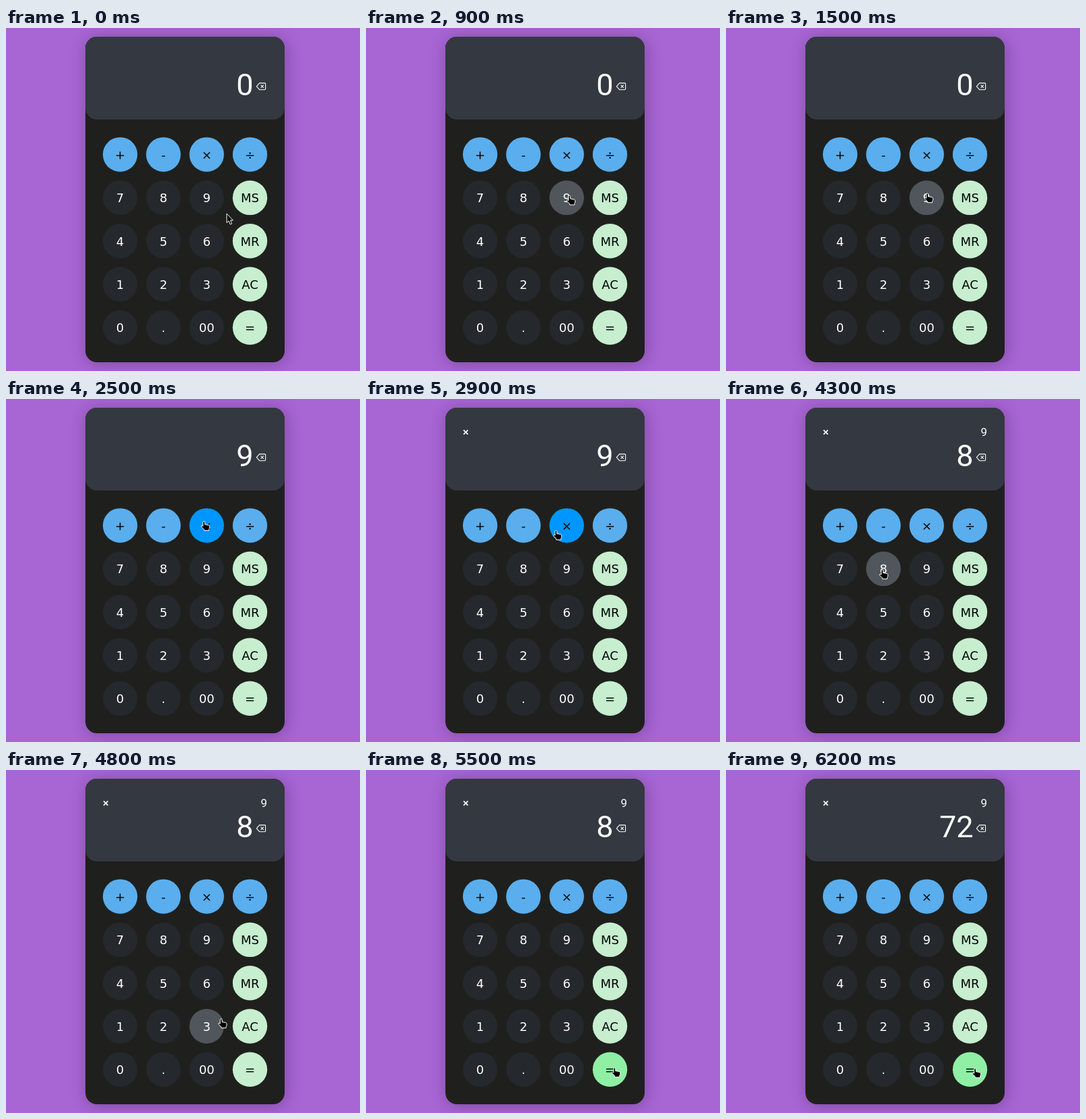
Write an HTML page that moves like this. It is 526 by 510 pixels and loops after 6700 ms.

```html
<!DOCTYPE html>
<html lang="en">
<head>
<meta charset="utf-8">
<title>Calculator</title>
<style>
  html, body { margin: 0; width: 100%; height: 100%; overflow: hidden; background: #a865d4; }
  #card {
    position: absolute; left: 118.3px; top: 12.7px; width: 295.4px; height: 484.3px;
    border-radius: 17px; background: #1f201d; box-shadow: 2px 2px 24px rgba(20, 5, 40, .28);
  }
  #screen { height: 123.8px; border-radius: 17px; background: #343840; }
  svg { position: absolute; left: 0; top: 0; display: block; }
  text { font: 18px "DejaVu Sans", sans-serif; text-anchor: middle; }
  .op { --base: #5aaeed; --hot: #0096ff; --ink: #000; }
  .num { --base: #25282c; --hot: #50565b; --ink: #fff; }
  .fn { --base: #c6eecf; --hot: #8fefa5; --ink: #000; }
  .key circle { fill: var(--base); }
  .key.on circle { fill: var(--hot); }
  .key text { fill: var(--ink); }
  #sign, #memo, #value { font-family: Roboto, sans-serif; font-size: 17px; fill: #fff; }
  #sign { font-weight: 500; text-anchor: start; }
  #memo, #value { text-anchor: end; }
  #value { font-size: 45px; }
  #erase { fill: none; stroke: #fff; stroke-width: 1.1; stroke-linejoin: round; }
  #cursor path { fill: #000; stroke: #fff; stroke-width: 1; stroke-linejoin: round; }
</style>
</head>
<body>
<div id="card"><div id="screen"></div></div>
<svg width="526" height="510" viewBox="0 0 526 510">
  <text id="sign" x="143.7" y="55"></text>
  <text id="memo" x="388" y="55"></text>
  <text id="value" x="367.6" y="100.3">0</text>
  <path id="erase" d="M376.6 81.9H384.4Q385.6 81.9 385.6 83V90.6Q385.6 91.7 384.4 91.7H376.6L372.3 86.8ZM378.6 84.7L382.8 88.9M382.8 84.7L378.6 88.9"/>
  <g id="keys"></g>
  <g id="cursor">
    <path id="arrow" d="M0 0V13.5L3 10.8L5.2 16L7.6 15L5.4 10H9.3Z"/>
    <path id="hand" d="M-1.3 1.2Q-1.3 -.2 .1 -.2T1.5 1.2V4.6L7.2 5.6Q8.6 6 8.5 7.5V9.8L7.5 11.5V13.6H.3V11.8L-3.8 8Q-4.4 6.2 -2.6 6.3L-1.3 7.2Z"/>
  </g>
</svg>
<script>
  const LOOP = 6700, STEP = 100, RADIUS = 25.7, PITCH = 64.3;
  const NS = "http://www.w3.org/2000/svg";
  const $ = id => document.getElementById(id);

  function add(parent, tag, attrs) {
    const el = document.createElementNS(NS, tag);
    for (const name in attrs) el.setAttribute(name, attrs[name]);
    return parent.appendChild(el);
  }

  const keys = [];
  const rows = ["+ - × ÷", "7 8 9 MS", "4 5 6 MR", "1 2 3 AC", "0 . 00 ="];
  rows.forEach((row, r) => row.split(" ").forEach((label, c) => {
    const x = 169.6 + c * PITCH, y = 188.1 + r * PITCH;
    const kind = r === 0 ? "op" : c === 3 ? "fn" : "num";
    const el = add($("keys"), "g", { class: "key " + kind });
    add(el, "circle", { cx: x, cy: y, r: RADIUS });
    add(el, "text", { x, y: y + 6.8 }).textContent = label;
    keys.push({ el, x, y });
  }));

  // Each move slows down towards its goal.
  const home = { x: 328, y: 276 };
  const moves = [
    { from: 100, to: 1300, x: 299, y: 246 },
    { from: 1900, to: 2500, x: 294, y: 182 },
    { from: 2800, to: 3800, x: 232, y: 254 },
    { from: 4400, to: 4800, x: 319.5, y: 370 },
    { from: 4800, to: 5600, x: 370, y: 444 }
  ];

  const presses = [
    { at: 0, sign: "", memo: "", value: "0" },
    { at: 1800, value: "9" },
    { at: 2700, sign: "×" },
    { at: 4200, memo: "9", value: "8" },
    { at: 6000, value: "72" }
  ];

  const easeOut = k => 1 - (1 - k) ** 2;

  function pointer(t) {
    let { x, y } = home;
    for (const m of moves) {
      const k = easeOut(Math.min(1, Math.max(0, (t - m.from) / (m.to - m.from))));
      x += (m.x - x) * k;
      y += (m.y - y) * k;
    }
    return { x, y };
  }

  function draw(time) {
    const t = Math.floor(time % LOOP / STEP) * STEP;
    const { x, y } = pointer(t);
    let over = false;
    for (const key of keys) {
      const on = Math.hypot(x - key.x, y - key.y) < RADIUS;
      key.el.classList.toggle("on", on);
      over = over || on;
    }
    $("cursor").setAttribute("transform", `translate(${x} ${y})`);
    $("hand").style.display = over ? "" : "none";
    $("arrow").style.display = over ? "none" : "";

    const shown = Object.assign({}, ...presses.filter(p => p.at <= t));
    for (const id of ["sign", "memo", "value"]) $(id).textContent = shown[id];
  }

  const start = performance.now();
  function tick() {
    draw(performance.now() - start);
    requestAnimationFrame(tick);
  }
  tick();
</script>
</body>
</html>
```
